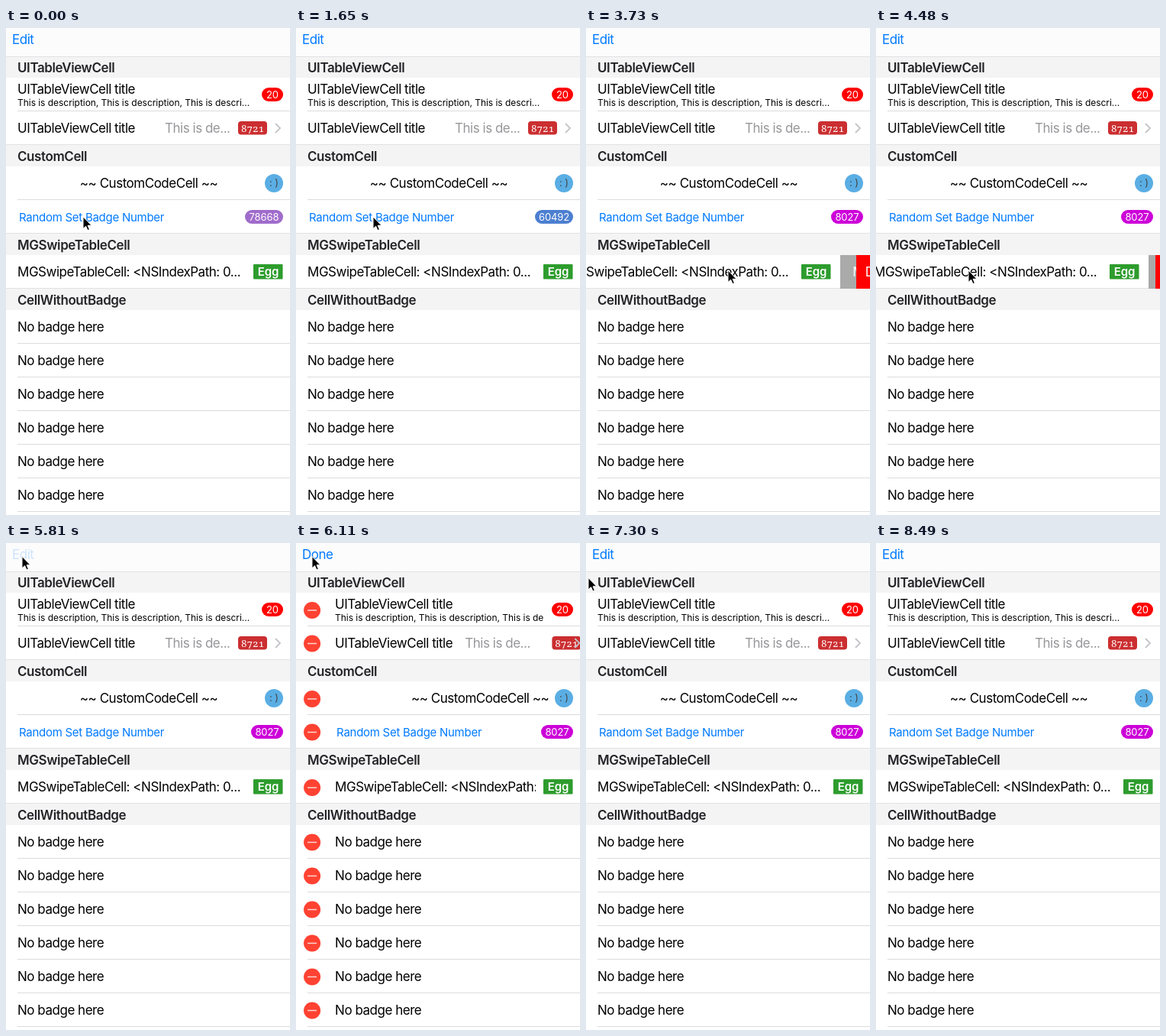
An HTML page for the animation above (8.62 s loop, 372 px wide and 637 px high).

```html
<!DOCTYPE html>
<html lang="en">
<head>
<meta charset="utf-8">
<title>Badge table</title>
<style>
html, body { margin: 0; width: 100%; height: 100%; overflow: hidden; background: #fff; }
svg { display: block; width: 372px; height: 637px; }
text { font: 17px Inter, "Open Sans", sans-serif; letter-spacing: -.48px; white-space: pre; }
.head { font-weight: 600; fill: #232327; letter-spacing: -.41px; }
.blue { fill: #007aff; }
.white { fill: #fff; }
.mid { text-anchor: middle; }
.small { font-size: 12px; letter-spacing: -.04px; }
.action { font-size: 15px; letter-spacing: -.27px; }
.num { font-size: 13px; letter-spacing: -.1px; }
.egg { font-size: 15px; font-weight: 600; letter-spacing: -.1px; }
.serif { font: 13px "Noto Serif", serif; font-variant-numeric: oldstyle-nums; letter-spacing: 0; }
</style>
</head>
<body>
<svg id="stage" viewBox="0 0 372 637"></svg>
<script>
const LOOP = 8620;
const stage = document.getElementById('stage');

const rect = (x, y, w, h, fill, extra = '') =>
  `<rect x="${x}" y="${y}" width="${w}" height="${h}" fill="${fill}" ${extra}/>`;
const text = (x, y, str, cls = '', extra = '') =>
  `<text x="${x}" y="${y}" class="${cls}" ${extra}>${str.replace(/</g, '&lt;')}</text>`;
const clip = (id, right) => `<clipPath id="${id}">${rect(0, 0, right, 637, '#000')}</clipPath>`;
const group = (id, body, extra = '') => `<g id="${id}" ${extra}>${body}</g>`;
const line = (y, x = 15) => rect(x, y, 372, 1, '#dcdcde');
const header = (y, h, str) =>
  rect(0, y, 372, h, '#f4f4f4') + rect(0, y, 372, 1, '#e2e2e4') + text(15, y + h - 7.5, str, 'head');
const minus = y =>
  `<circle cx="23" cy="${y}" r="11" fill="#ff3828"/>` + rect(17, y - .75, 12, 1.5, '#ffd2cc');

const plainRows = [0, 1, 2, 3, 4, 5].map(i => 369 + 44 * i);
const rowMiddles = [88, 131.5, 204, 247.5, 320, ...plainRows.map(y => y + 22.5)];

stage.innerHTML = `<defs>${clip('subClip', 325)}${clip('swipeClip', 314)}</defs>`
  + rect(0, 0, 372, 637, '#fff')
  + rect(0, 0, 372, 38, '#fcfcfc')
  + text(8, 21, 'Edit', 'blue', 'id="nav"')
  + header(37, 28, 'UITableViewCell')
  + line(108) + line(224)
  + plainRows.map(y => line(y + 43)).join('')
  + group('', group('sub', text(15, 102, '', 'small', 'id="subText"')), 'clip-path="url(#subClip)"')
  + group('main',
      text(15, 86, 'UITableViewCell title')
      + text(15, 137, 'UITableViewCell title')
      + text(17, 252.5, 'Random Set Badge Number', 'blue action')
      + plainRows.map(y => text(15, y + 28, 'No badge here')).join(''))
  + rect(335, 78, 28, 18, '#f00', 'rx="9"') + text(349, 91.7, '20', 'white mid num')
  + group('detail', text(208, 137, 'This is de...', '', 'fill="#97979b"'))
  + group('serif', rect(304, 122, 38, 17.5, '#cb2e30', 'rx="4"') + text(323, 135.5, '8721', 'white mid serif'))
  + group('chevron', '<path d="M353 125l6 6-6 6" fill="none" stroke="#c4c4c9" stroke-width="1.8"/>')
  + header(152, 29, 'CustomCell')
  + group('custom', text(187, 208.5, '~~ CustomCodeCell ~~', 'mid'))
  + '<circle cx="351" cy="203" r="12" fill="#5aaee4"/>' + text(351, 207, ': )', 'mid num', 'fill="#444"')
  + rect(0, 238, 0, 18, '', 'rx="9" id="pill"') + text(0, 251.7, '', 'white mid num', 'id="pillText"')
  + header(268, 29, 'MGSwipeTableCell')
  + header(340, 29, 'CellWithoutBadge')
  + rect(0, 297, 0, 44, '#aaa', 'id="more"') + text(0, 325, 'More', 'white mid', 'id="moreText"')
  + rect(0, 297, 0, 44, '#f00', 'id="del"') + text(0, 325, 'Delete', 'white mid', 'id="delText"')
  + group('cell', rect(0, 297, 375, 43, '#fff')
      + group('', group('swipe', text(15, 325, '', '', 'id="swipeText"')), 'clip-path="url(#swipeClip)"')
      + rect(324, 309, 38.5, 19.5, '#2d9c2d', 'rx="1"') + text(343.5, 324.4, 'Egg', 'white mid egg'))
  + group('minuses', rowMiddles.map(minus).join(''))
  + group('cursor', '<path d="M0 0V15.5L3.6 12.2 6 17.6 8.4 16.6 6.1 11.3H11Z" fill="#000" stroke="#fff" stroke-width="1"/>');

const $ = id => document.getElementById(id);
const set = (id, attrs) => { for (const k in attrs) $(id).setAttribute(k, attrs[k]); };
const move = (id, x, y = 0) => set(id, { transform: `translate(${x} ${y})` });
const say = (id, str) => { if ($(id).textContent !== str) $(id).textContent = str; };

const bezier = (a, b, c, d, u) => {
  const v = 1 - u;
  return a * v ** 3 + 3 * b * v * v * u + 3 * c * v * u * u + d * u ** 3;
};
const arc = u => [bezier(101, 120, 215, 228, u), bezier(247, 400, 450, 313, u)];

// The screen refreshes only at these times; each step changes part of the state.
const steps = [
  [0, { badge: '78668', color: '#a06ccb', pos: [101, 247], open: 0, edit: 0, nav: 'Edit', fade: 1 }],
  [900, { badge: '41835', color: '#5b9a68' }],
  [1650, { badge: '60492', color: '#4c7fd0' }],
  [2090, { badge: '8027', color: '#cc00d8' }],
  ...[1, 2, 3, 4, 5].map(i => [2390 + 150 * i, { pos: arc(i / 5) }]),
  [3440, { pos: [222, 315], open: 5 }],
  [3590, { pos: [186, 317], open: 42 }],
  [3740, { pos: [146, 317], open: 82 }],
  [3880, { pos: [121, 317], open: 130 }],
  [4030, { open: 144 }],
  [4480, { open: 18 }],
  [4630, { pos: [114, 288], open: 0 }],
  [4780, { pos: [52, 64] }],
  [4920, { pos: null }],
  [5220, { pos: [15, 18] }],
  [5370, { pos: [21, 17.5] }],
  [5810, { fade: .18 }],
  [5960, { nav: 'Done', fade: .6, edit: .5 }],
  [6110, { fade: 1, edit: .95 }],
  [6260, { edit: 1 }],
  [6860, { fade: .18 }],
  [7010, { nav: 'Edit', fade: .6, edit: .5 }],
  [7150, { pos: [17, 24], fade: 1, edit: .05 }],
  [7300, { pos: [3, 45.5], edit: 0 }],
  [7450, { pos: null }],
  [7740, { pos: [2, 622] }],
  [7890, { pos: [190, 626] }],
  [8040, { pos: null }],
  [8340, { pos: [331, 632] }],
  [8490, { pos: null }]
];

function draw(t) {
  const s = Object.assign({}, ...steps.filter(k => k[0] <= t).map(k => k[1]));
  const e = s.edit;

  say('nav', s.nav);
  set('nav', { opacity: s.fade });
  for (const id of ['main', 'sub', 'swipe']) move(id, 38 * e);
  move('detail', 14 * e);
  move('serif', 33 * e);
  move('chevron', 13 * e);
  move('custom', 57 * e);
  move('minuses', 38 * (e - 1));
  set('minuses', { opacity: e });
  const once = 'This is description, ';
  say('subText', once + once + (e ? 'This is description' : 'This is descri...'));
  say('swipeText', 'MGSwipeTableCell: <NSIndexPath: 0' + (e ? 'xc000' : '...'));

  const w = s.badge.length > 4 ? 50 : 42;
  set('pill', { x: 363 - w, width: w, fill: s.color });
  say('pillText', s.badge);
  set('pillText', { x: 363 - w / 2 });

  const half = s.open / 2, left = 375 - s.open;
  move('cell', -s.open);
  set('more', { x: left, width: half });
  set('del', { x: left + half, width: half });
  set('moreText', { x: left + 36 });
  set('delText', { x: left + half + 36 });

  set('cursor', { opacity: s.pos ? 1 : 0 });
  if (s.pos) move('cursor', ...s.pos);
}

const start = performance.now();
function tick() {
  draw((performance.now() - start) % LOOP);
  requestAnimationFrame(tick);
}
tick();
</script>
</body>
</html>
```
